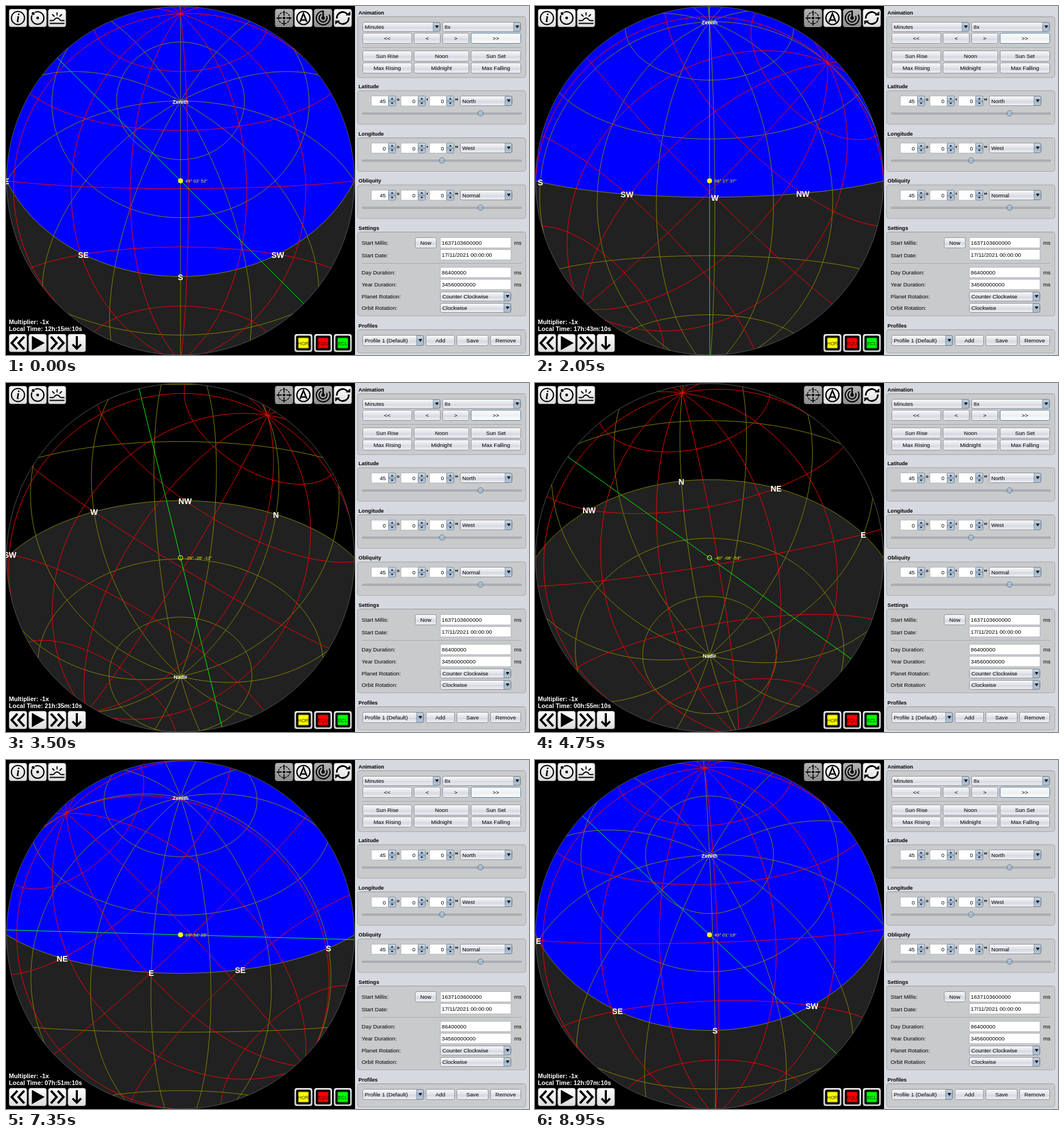
Animation, 917 px wide and 611 px high, one loop 9000 ms. Source, as an HTML page with a canvas:

```html
<!DOCTYPE html>
<html lang="en">
<head>
<meta charset="utf-8">
<title>Sky simulator</title>
<style>
  html, body { margin: 0; width: 917px; height: 611px; overflow: hidden; background: #000; }
  canvas, svg { position: absolute; left: 0; top: 0; }
  text { font-family: "Liberation Sans", Arial, sans-serif; white-space: pre; }
</style>
</head>
<body>
<canvas id="sky" width="612" height="611"></canvas>
<svg id="ui" width="917" height="611" viewBox="0 0 917 611">
  <defs>
    <linearGradient id="button" x2="0" y2="1">
      <stop offset="0" stop-color="#fafafc"/><stop offset=".5" stop-color="#dfe2e7"/>
      <stop offset=".55" stop-color="#d4d8df"/><stop offset="1" stop-color="#eff2f7"/>
    </linearGradient>
    <linearGradient id="focus" x2="0" y2="1">
      <stop offset="0" stop-color="#fff"/><stop offset=".55" stop-color="#eceff3"/><stop offset="1" stop-color="#fff"/>
    </linearGradient>
    <linearGradient id="blue" x2="0" y2="1">
      <stop offset="0" stop-color="#d0dbe6"/><stop offset=".5" stop-color="#9fb3c8"/><stop offset="1" stop-color="#b9cbdd"/>
    </linearGradient>
    <linearGradient id="light" x2="0" y2="1">
      <stop offset="0" stop-color="#fff"/><stop offset="1" stop-color="#dcdcdc"/>
    </linearGradient>
    <linearGradient id="grey" x2="0" y2="1">
      <stop offset="0" stop-color="#b4b4b4"/><stop offset="1" stop-color="#8e8e8e"/>
    </linearGradient>
  </defs>
</svg>
<script>
const svg = document.getElementById('ui');
let markup = '';
const add = s => { markup += s; };

// ---------- static interface ----------
const rect = (x, y, x2, y2, r, fill, stroke = 'none', extra = '') =>
  add(`<rect x="${x}" y="${y}" width="${x2 - x}" height="${y2 - y}" rx="${r}" fill="${fill}" stroke="${stroke}" ${extra}/>`);
const path = (d, fill = 'none', stroke = 'none', width = 1, extra = '') =>
  add(`<path d="${d}" fill="${fill}" stroke="${stroke}" stroke-width="${width}" ${extra}/>`);
const circle = (x, y, r, fill, stroke = 'none', width = 1, extra = '') =>
  add(`<circle cx="${x}" cy="${y}" r="${r}" fill="${fill}" stroke="${stroke}" stroke-width="${width}" ${extra}/>`);
const escapeText = s => s.replace(/&/g, '&amp;').replace(/</g, '&lt;');
const label = (x, y, s, anchor = 'start', size = 9.7, extra = '') =>
  add(`<text x="${x}" y="${y}" text-anchor="${anchor}" font-size="${size}" ${extra}>${escapeText(s)}</text>`);

const triangle = (x, y, w, h) => path(`M${x - w} ${y - h / 2}h${2 * w}l${-w} ${h}z`, '#111');

function button(x, x2, y, s, focused) {
  rect(x + .5, y + .5, x2 - .5, y + 18.5, 3, focused ? 'url(#focus)' : 'url(#button)', focused ? '#4f7da6' : '#8d9096');
  label((x + x2) / 2, y + 13.3, s, 'middle');
}

function combo(x, x2, y, s, h = 17) {
  rect(x + .5, y + .5, x2 - .5, y + h - .5, 3, 'url(#button)', '#8d9096');
  path(`M${x2 - 13} ${y + 1}h9q3 0 3 3v${h - 8}q0 3 -3 3h-9z`, 'url(#blue)', '#6f8296', .8);
  triangle(x2 - 6.5, y + h / 2, 3.2, 5);
  label(x + 4, y + h / 2 + 3.6, s);
}

function field(x, x2, y, s) {
  rect(x + .5, y + .5, x2 - .5, y + 18.5, 0, '#fff', '#b3b6bb');
  label(x + 3, y + 13.2, s);
}

function spinner(x, y, value, unit) {
  rect(x + .5, y - 8.5, x + 31, y + 9, 0, '#fff', '#b3b6bb');
  rect(x + 30.5, y - 8.5, x + 43.5, y + 9, 2, 'url(#blue)', '#7b8da0');
  path(`M${x + 31} ${y + .5}h12`, 'none', '#7b8da0');
  triangle(x + 37, y - 4, 2.2, -3.2);
  triangle(x + 37, y + 4.5, 2.2, 3.2);
  label(x + 26, y + 4.3, String(value), 'end');
  label(x + 45, y + 5, unit, 'start', 13, 'font-weight="bold"');
}

function group(title, y, y2) {
  label(618, y - 3.5, title, 'start', 9.2, 'font-weight="bold"');
  rect(616.5, y + .5, 911.5, y2 - .5, 4, '#c9cacc', '#a5a8ad');
  path(`M619 ${y + 1.5}H909`, 'none', '#b8babd');
}

const separator = y => path(`M624 ${y}H904`, 'none', '#a6a9ae');

function angleGroup(title, y, degrees, side, thumb) {
  group(title, y, y + 60);
  const row = y + 18.5;
  spinner(640, row, degrees, '°');
  spinner(692, row, 0, "'");
  spinner(742, row, 0, '"');
  combo(796, 888, row - 9, side, 18);
  rect(624.5, y + 39.5, 904, y + 42, 1, '#b4b8be', '#8f949b', 'stroke-width=".8"');
  circle(thumb, y + 40.5, 4.7, 'url(#blue)', '#5c6f84');
}

function panel() {
  rect(612, 0, 917, 611, 0, '#d6d9df');
  path('M612.5 0V611', 'none', '#e6e8ec');

  group('Animation', 18, 126);
  combo(625, 762, 28, 'Minutes');
  combo(765, 903, 28, '8x');
  button(625, 712, 47, '<<');
  button(715, 762, 47, '<');
  button(765, 812, 47, '>');
  button(815, 903, 47, '>>', true);
  separator(72.5);
  [['Sun Rise', 'Noon', 'Sun Set'], ['Max Rising', 'Midnight', 'Max Falling']].forEach((names, i) => {
    const y = 78 + 21 * i;
    button(625, 712, y, names[0]);
    button(715, 812, y, names[1]);
    button(815, 903, y, names[2]);
  });

  angleGroup('Latitude', 147.5, 45, 'North', 832);
  angleGroup('Longitude', 230, 0, 'West', 764.5);
  angleGroup('Obliquity', 312.5, 45, 'Normal', 832);

  group('Settings', 395, 543);
  const rows = { 'Start Millis:': 417.5, 'Start Date:': 439.5, 'Day Duration:': 469.8,
    'Year Duration:': 491.3, 'Planet Rotation:': 511.8, 'Orbit Rotation:': 531.5 };
  for (const name in rows) label(623.5, rows[name], name);
  button(717, 755, 405, 'Now');
  field(761, 886, 405, '1637103600000');
  field(761, 886, 426, '17/11/2021 00:00:00');
  separator(450.5);
  field(761, 886, 457, '86400000');
  field(761, 886, 478, '34560000000');
  [417.5, 469.8, 491.3].forEach(y => label(891, y, 'ms'));
  combo(761, 886, 500, 'Counter Clockwise');
  combo(761, 886, 520, 'Clockwise');

  group('Profiles', 566, 608);
  combo(625, 733, 576, 'Profile 1 (Default)', 19);
  button(736, 787, 576, 'Add');
  button(790, 846, 576, 'Save');
  button(849, 903, 576, 'Remove');
}

// Toolbar icons are drawn around the centre of each tile.
function tile(x, y, icon, fill = 'url(#light)') {
  add(`<g transform="translate(${x} ${y})">`);
  rect(-15.5, -15.5, 15.5, 15.5, 3.5, fill, '#8a8a8a');
  icon();
  add('</g>');
}

const ring = (r = 11, w = 2.4, extra = '') => circle(0, 0, r, 'none', '#000', w, extra);
const icons = {
  info() {
    ring(11.5, 2);
    add('<text y="6.5" text-anchor="middle" font-size="20" font-weight="bold" font-style="italic" style="font-family:\'Liberation Serif\',serif">i</text>');
  },
  orbit() {
    ring(11, 2.2);
    circle(0, 0, 2.4, '#000');
    circle(-7.8, -7.8, 3.2, '#000', '#f4f4f4', 1.2);
  },
  sunrise() {
    path('M0 -10v5.5M-8.5 -6.5l4 4M8.5 -6.5l-4 4', 'none', '#000', 2);
    path('M-13 4.5h5q3 0 4 -2.5q4 -4 8 0q1 2.5 4 2.5h5M-13 9.5h26', 'none', '#000', 2);
  },
  compass() {
    ring(10, 1.4, 'stroke-dasharray="4 1.5"');
    path('M0 -13V-4M0 4V13M-13 0H-4M4 0H13', 'none', '#000', 1.8);
    circle(0, 0, 2.3, '#000');
  },
  letter() {
    ring(11.5, 2.2);
    path('M-6 7L0 -8L6 7M-3.5 3.5H3.5', 'none', '#000', 2.5);
  },
  dial() {
    path('M0 -12A12 12 0 1 0 10.5 -6', 'none', '#000', 2.1);
    path('M-3 -6.5A7 7 0 1 0 6 -3.5', 'none', '#000', 2.1);
    path('M0 -13V0', 'none', '#000', 2.6);
    circle(0, 0, 3, '#000');
  },
  cycle() {
    path('M-10.5 1A10.5 10.5 0 0 1 8.5 -6M10.5 -1A10.5 10.5 0 0 1 -8.5 6', 'none', '#000', 3);
    path('M5 -4.5h8.2v-7zM-5 4.5h-8.2v7z', '#000');
  },
  back() { path('M-1 -11L-11 0L-1 11M11 -11L1 0L11 11', 'none', '#000', 4); },
  play() { path('M-10 -12.5L12.5 0L-10 12.5z', '#000'); },
  forward() { path('M-11 -11L-1 0L-11 11M1 -11L11 0L1 11', 'none', '#000', 4); },
  down() { path('M0 -12V9M-7.5 2.5L0 10L7.5 2.5', 'none', '#000', 3.6); },
};

function toolbars() {
  tile(21, 21, icons.info);
  tile(55.5, 21, icons.orbit);
  tile(89.5, 21, icons.sunrise);
  tile(487.5, 21, icons.compass, 'url(#grey)');
  tile(521.5, 21, icons.letter);
  tile(556, 21, icons.dial, 'url(#grey)');
  tile(590.5, 21, icons.cycle);
  ['back', 'play', 'forward', 'down'].forEach((name, i) => tile(21 + 34.4 * i, 590, icons[name]));
  [['HOR', '#ff0'], ['EQU', '#f00'], ['ECL', '#0f0']].forEach(([name, color], i) =>
    tile(521.5 + 34.5 * i, 590, () => {
      rect(-13, -13, 13, 13, 3, '#000');
      rect(-9.5, -9.5, 9.5, 9.5, 2, color, '#000', 'stroke-opacity=".5" stroke-width="2"');
      label(0, 3.6, name, 'middle', 8.6, 'fill-opacity=".75"');
    }));
  label(5, 557, 'Multiplier: -1x', 'start', 10.8, 'font-weight="bold" fill="#fff"');
  label(5, 568.8, '', 'start', 10.8, 'id="clock" font-weight="bold" fill="#fff"');
}

toolbars();
panel();
svg.insertAdjacentHTML('beforeend', markup);
const clock = document.getElementById('clock');

// ---------- sky ----------
const ctx = document.getElementById('sky').getContext('2d');
const { sin, cos, asin, atan2, PI } = Math;
const RAD = PI / 180, CENTER = 306, RADIUS = 305;
const EYE = 1.75; // distance of the viewpoint behind the sphere's centre, in sphere radii
const LATITUDE = 45 * RAD, OBLIQUITY = 45 * RAD;
const SUN_DEC = 4.0478 * RAD;
const SUN_LONGITUDE = asin(sin(SUN_DEC) / sin(OBLIQUITY));
const rightAscension = lon => atan2(cos(OBLIQUITY) * sin(lon), cos(lon));
const SUN_RA = rightAscension(SUN_LONGITUDE);
const FONT = '"Liberation Sans", Arial, sans-serif';
const pad = n => String(n).padStart(2, '0');
const dot = (a, b) => a[0] * b[0] + a[1] * b[1] + a[2] * b[2];

// Vectors are [south, west, zenith]; azimuth runs from south to west.
const horizontal = (az, alt) => [cos(alt) * cos(az), cos(alt) * sin(az), sin(alt)];
const equatorial = (hour, dec) => [
  sin(LATITUDE) * cos(dec) * cos(hour) - cos(LATITUDE) * sin(dec),
  cos(dec) * sin(hour),
  sin(LATITUDE) * sin(dec) + cos(LATITUDE) * cos(dec) * cos(hour)];

// Perspective view of the sphere centred on the sun, zenith upwards.
function makeProjection(sun) {
  const az = atan2(sun[1], sun[0]), alt = asin(sun[2]);
  const right = [-sin(az), cos(az), 0];
  const up = [-sin(alt) * cos(az), -sin(alt) * sin(az), cos(alt)];
  return p => {
    const depth = dot(p, sun);
    const k = RADIUS * EYE / (EYE + depth);
    return { x: CENTER + k * dot(p, right), y: CENTER - k * dot(p, up), depth };
  };
}

function curve(pointAt, from, to, project) {
  let drawing = false;
  for (let a = from; a <= to; a += 2) {
    const p = project(pointAt(a * RAD));
    if (p.depth < -.1) { drawing = false; continue; }
    if (drawing) ctx.lineTo(p.x, p.y); else ctx.moveTo(p.x, p.y);
    drawing = true;
  }
}

function grid(color, point, project) {
  ctx.beginPath();
  for (let lat = -60; lat <= 60; lat += 30) curve(a => point(a, lat * RAD), 0, 360, project);
  for (let lon = 0; lon < 360; lon += 30) curve(a => point(lon * RAD, a), -90, 90, project);
  ctx.strokeStyle = color;
  ctx.stroke();
}

function caption(s, p, size) {
  if (p.depth <= 0) return;
  ctx.font = `bold ${size}px ${FONT}`;
  ctx.fillText(s, p.x, p.y + 1 + size * .36);
}

function sexagesimal(angle) {
  const sign = angle < 0 ? '-' : '', seconds = Math.floor(Math.abs(angle) / RAD * 3600);
  return `${sign}${pad(Math.floor(seconds / 3600))}° ${sign}${pad(Math.floor(seconds / 60) % 60)}' ${sign}${pad(seconds % 60)}"`;
}

function drawSky(turn) {
  const hour = (360.343 * turn - 1e-4) * RAD;
  const sun = equatorial(hour, SUN_DEC);
  const project = makeProjection(sun);
  const altitude = asin(sun[2]), azimuth = atan2(sun[1], sun[0]);
  const daylight = Math.max(0, Math.min(1, 1 + altitude / (18 * RAD))) ** 2;

  ctx.fillStyle = '#000';
  ctx.fillRect(0, 0, 612, 611);
  ctx.save();
  ctx.beginPath();
  ctx.arc(CENTER, CENTER, RADIUS, 0, 2 * PI);
  ctx.clip();
  ctx.fillStyle = `rgb(0,0,${Math.round(255 * daylight)})`;
  ctx.fillRect(0, 0, 612, 611);

  ctx.beginPath();
  curve(a => horizontal(azimuth + a, 0), -90, 90, project);
  ctx.arc(CENTER, CENTER, RADIUS, 0, PI);
  ctx.fillStyle = '#212121';
  ctx.fill();

  ctx.lineWidth = 1;
  grid('#868600', horizontal, project);
  grid('#f00', (ra, dec) => equatorial(hour + SUN_RA - ra, dec), project);

  const lon = SUN_LONGITUDE + PI / 2;
  const end = project(equatorial(hour + SUN_RA - rightAscension(lon), asin(sin(OBLIQUITY) * sin(lon))));
  ctx.beginPath();
  ctx.moveTo(end.x, end.y);
  ctx.lineTo(2 * CENTER - end.x, 2 * CENTER - end.y);
  ctx.strokeStyle = '#0f0';
  ctx.stroke();
  ctx.restore();

  ctx.beginPath();
  ctx.arc(CENTER, CENTER, RADIUS, 0, 2 * PI);
  ctx.strokeStyle = '#555';
  ctx.stroke();

  ctx.fillStyle = '#fff';
  ctx.textAlign = 'center';
  ['S', 'SW', 'W', 'NW', 'N', 'NE', 'E', 'SE'].forEach((s, i) =>
    caption(s, project(horizontal(i * PI / 4, 0)), 14));
  caption('Zenith', project([0, 0, 1]), 9.3);
  caption('Nadir', project([0, 0, -1]), 9.3);

  ctx.beginPath();
  ctx.arc(CENTER, CENTER, 4, 0, 2 * PI);
  ctx.fillStyle = ctx.strokeStyle = '#ff0';
  if (altitude > 0) ctx.fill();
  ctx.stroke();
  ctx.textAlign = 'left';
  ctx.font = `8px ${FONT}`;
  ctx.fillText(sexagesimal(altitude), 314.5, 309);
}

const LOOP = 9000, TICK = 50, MINUTES_PER_TICK = 8;
let shownTick = -1;
function frame() {
  const tick = Math.floor(performance.now() % LOOP / TICK);
  if (tick !== shownTick) {
    shownTick = tick;
    drawSky(tick * TICK / LOOP);
    const minutes = (12 * 60 + 15 + tick * MINUTES_PER_TICK) % 1440;
    clock.textContent = `Local Time: ${pad(Math.floor(minutes / 60))}h:${pad(minutes % 60)}m:10s`;
  }
  requestAnimationFrame(frame);
}
frame();
</script>
</body>
</html>
```
